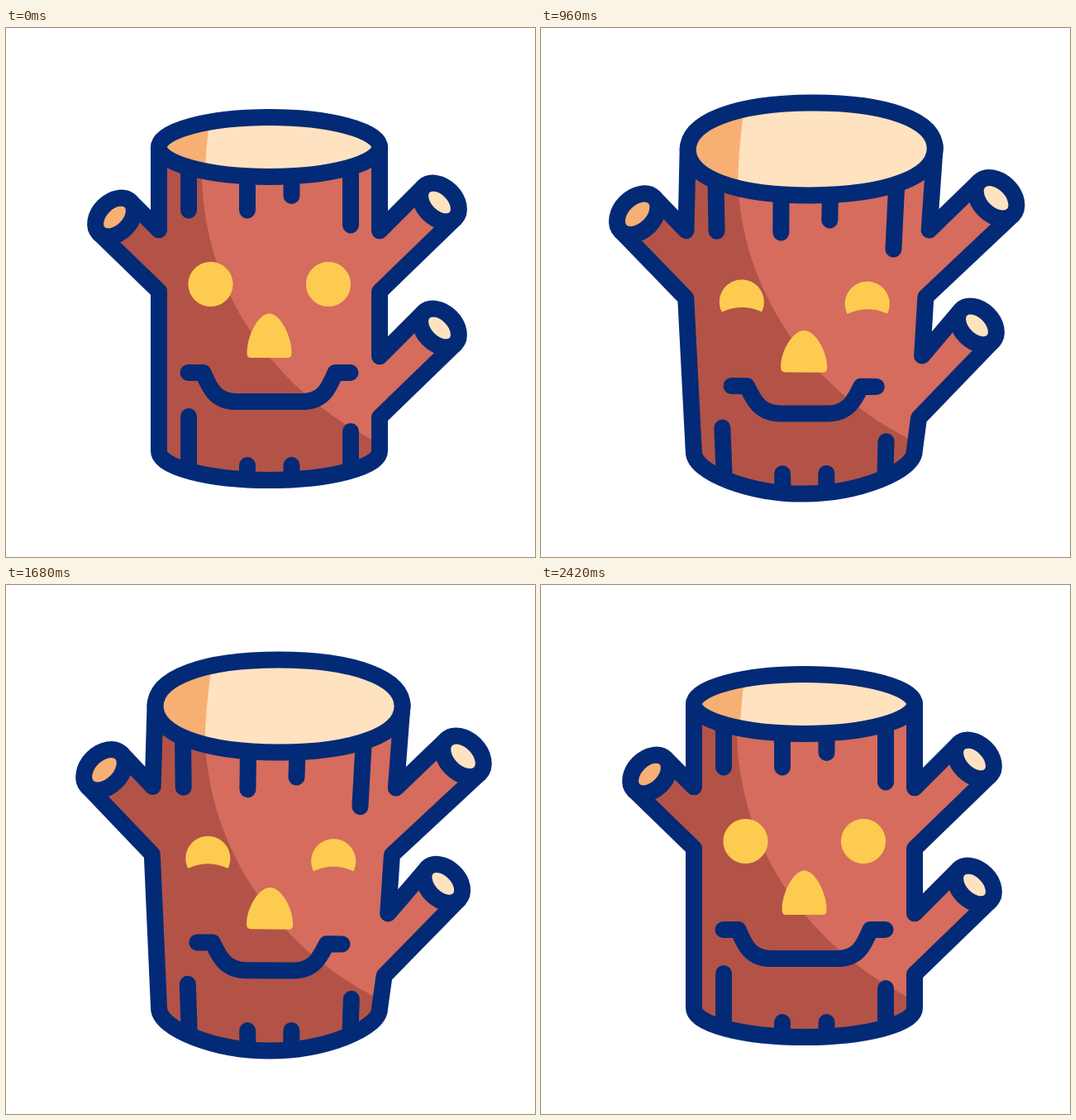
Animation of 640x640 px, one loop 2.8 s. Source, as an HTML page with a canvas:

```html
<!DOCTYPE html>
<html lang="en">
<head>
<meta charset="utf-8">
<title>Swaying stump</title>
<style>
  html, body { margin: 0; width: 100%; height: 100%; overflow: hidden; background: #fff; }
  canvas { display: block; width: 100%; height: 100%; }
</style>
</head>
<body>
<canvas id="stage" width="640" height="640"></canvas>
<script>
const ctx = document.getElementById('stage').getContext('2d');
const LOOP = 2800;
const NAVY = '#032a76', BARK = '#d56c5d', SHADE = '#b35347';
const CREAM = '#ffe2c0', ORANGE = '#f7af74', YELLOW = '#fdcb50';

const CENTER = 318.5, TOP = 144, BOTTOM = 512, HALF = 133.5;
const PIVOT = [332, 546];
const ROUND = 0.552; // Bezier handle length of a circle quadrant
const SLANT = Math.PI / 4;

// Swings that die away: [time in ms, degrees]
const SWAY = [[120, 0], [370, -2], [730, 8], [1140, -6], [1500, 4], [1800, -2], [2130, 1.2], [2420, 0]];

// Cut ends, and how far each moves when the trunk stretches
const LEFT = { x: 131.5, y: 229, side: -1, pull: [-13, -5], grow: 0.06, color: ORANGE };
const UPPER = { x: 524.5, y: 211, side: 1, pull: [28, -4], grow: 0.06, color: CREAM };
const LOWER = { x: 524.5, y: 363, side: 1, pull: [4, -2], grow: 0, color: CREAM };

// [x, end of the groove from the rim, start of the groove from the base]
const GROOVES = [[221, 220.5, 470], [292, 220.5, 529], [345.5, 203, 529], [417, 238.5, 488]];

const clamp = v => Math.min(1, Math.max(0, v));
const smooth = u => u * u * (3 - 2 * u);
const progress = (t, from, to) => clamp((t - from) / (to - from));

function swayAt(t) {
  let angle = 0;
  for (let i = 1; i < SWAY.length; i++) {
    const [t0, a0] = SWAY[i - 1], [t1, a1] = SWAY[i];
    if (t >= t0) angle = a0 + (a1 - a0) * smooth(progress(t, t0, t1));
  }
  return angle;
}

function joyAt(t) {
  const out = progress(t, 1690, 2420);
  return smooth(progress(t, 370, 690)) - (out + smooth(out)) / 2;
}

let joy = 0;
const mix = (calm, happy) => calm + (happy - calm) * joy;
const heightOf = y => (BOTTOM - y) / (BOTTOM - TOP);

// The silhouette widens and leans towards the top.
function edge(side, y, drop = 0) {
  const k = heightOf(y);
  return [CENTER + side * HALF + joy * (11 * k * k + side * 16 * Math.sqrt(k)), y + joy * drop * k];
}

// The front of the trunk slides down as the rim opens towards the viewer.
function front(x, y) {
  const k = heightOf(y), dx = x - CENTER;
  return [x + joy * (4 * k * k + dx / HALF * 16 * k), y + joy * (11 + 21 * k + 0.04 * dx * k)];
}

// Builds a path from M/L/Q/C commands and a list of points.
function trace(commands, points) {
  const path = new Path2D();
  let i = 0;
  const take = count => points.slice(i, i += count).flat();
  for (const c of commands) {
    if (c === 'M') path.moveTo(...take(1));
    else if (c === 'L') path.lineTo(...take(1));
    else if (c === 'Q') path.quadraticCurveTo(...take(2));
    else if (c === 'C') path.bezierCurveTo(...take(3));
    else path.closePath();
  }
  return path;
}

// Half an oval from one side to the other; a negative ry bulges upwards.
function halfOval(path, x, y, rx, ry, fullness) {
  path.bezierCurveTo(x - rx, y + ry * fullness, x - rx * fullness, y + ry, x, y + ry);
  path.bezierCurveTo(x + rx * fullness, y + ry, x + rx, y + ry * fullness, x + rx, y);
}

function fill(path, color) {
  ctx.fillStyle = color;
  ctx.fill(path);
}

function clipped(mask, draw) {
  ctx.save();
  ctx.clip(mask);
  draw();
  ctx.restore();
}

function branchEnd({ x, y, side, pull, grow }) {
  return {
    x: x + joy * pull[0],
    y: y + joy * pull[1],
    long: 27 * (1 + joy * grow),
    short: 19 * (1 + joy * grow),
    turn: side * SLANT
  };
}

// Outline of a branch from the notch above it to the trunk below it.
function branchOutline(branch) {
  const { x, y, side } = branch;
  const gap = Math.abs(x - CENTER) - HALF, spread = 27 * Math.SQRT1_2;
  const end = branchEnd(branch), reach = end.long * Math.SQRT1_2;
  return [
    edge(side, y - spread + gap - spread),
    [end.x - side * reach, end.y - reach],
    [end.x + side * reach, end.y + reach],
    edge(side, y + spread + 0.97 * (gap + spread), 14)
  ];
}

function drawTrunk() {
  const left = [edge(-1, TOP), ...branchOutline(LEFT), edge(-1, BOTTOM)];
  const right = [edge(1, TOP), ...branchOutline(UPPER), ...branchOutline(LOWER), edge(1, BOTTOM)];
  const trunk = trace('MLLLLL', left);
  halfOval(trunk, CENTER, BOTTOM, HALF, mix(35, 51.5), mix(ROUND, 0.49));
  right.reverse().forEach(p => trunk.lineTo(...p));
  trunk.closePath();

  const shift = 3 * joy;
  fill(trunk, BARK);
  clipped(trunk, () => {
    fill(trace('MLCLLLZ', [
      [237 + shift, 100], [237 + shift, 180],
      [240 + shift, 320], [325 + shift, 437], [443 + shift, 498],
      [443 + shift, 620], [60, 620], [60, 100]]), SHADE);
    for (const [x, upper, lower] of GROOVES) {
      ctx.stroke(trace('ML', [front(x, 155), front(x, upper)]));
      ctx.stroke(trace('ML', [front(x, lower), front(x, 560)]));
    }
  });
  ctx.stroke(trunk);
}

function drawBranchEnd(branch) {
  const { x, y, long, short, turn } = branchEnd(branch);
  const path = new Path2D();
  path.ellipse(x, y, long, short, turn, 0, Math.PI * 2);
  fill(path, branch.color);
  ctx.stroke(path);
}

function drawRim() {
  const x = CENTER + 11 * joy, y = TOP + 2.5 * joy;
  const rx = HALF + 16 * joy, ry = 36 + 20 * joy, fullness = mix(ROUND, 0.61);
  const rim = trace('M', [[x - rx, y]]);
  halfOval(rim, x, y, rx, -ry, fullness);
  halfOval(rim, x, y, -rx, ry, fullness);
  fill(rim, CREAM);
  clipped(rim, () => fill(trace('MLQLZ',
    [[150, 60], [248, 100], [241, 145], [240, 195], [150, 240]]), ORANGE));
  ctx.stroke(rim);
}

// A disc whose lower part is pushed up into a smile.
function drawEye(x, y) {
  const [cx, cy] = front(x, y), r = 27, points = [];
  for (let a = 0; a < Math.PI * 2; a += Math.PI / 60) {
    const dx = r * Math.cos(a), dy = r * Math.sin(a);
    const cheek = 6.5 + 7 * Math.cos(a) ** 2;
    points.push([cx + dx, cy + mix(dy, Math.min(dy, cheek))]);
  }
  fill(trace('M' + 'L'.repeat(points.length - 1) + 'Z', points), YELLOW);
}

function mirrored(half) {
  return [...half.map(([dx, y]) => [-dx, y]), ...half.slice().reverse()];
}

function drawNose() {
  const half = [[22, 399], [27, 399], [27, 393], [27, 372], [13, 345.5], [0, 345.5]];
  const points = mirrored(half).map(([dx, y]) => front(CENTER + dx, y));
  points.splice(half.length, 1); // both halves share the tip
  fill(trace('MQCCQZ', points), YELLOW);
}

function drawMouth() {
  const half = [[98, 417], [80, 417], [72, 436], [65, 452], [40, 452]];
  const points = mirrored(half).map(([dx, y]) => front(CENTER + dx - Math.sign(dx) * 13 * joy, y));
  ctx.stroke(trace('MLCLCL', points));
}

function draw(t) {
  joy = joyAt(t);
  ctx.setTransform(1, 0, 0, 1, 0, 0);
  ctx.fillStyle = '#fff';
  ctx.fillRect(0, 0, 640, 640);
  ctx.translate(...PIVOT);
  ctx.rotate(swayAt(t) * Math.PI / 180);
  ctx.translate(-PIVOT[0], -PIVOT[1]);
  ctx.strokeStyle = NAVY;
  ctx.lineWidth = 20;
  ctx.lineCap = ctx.lineJoin = 'round';

  drawTrunk();
  [LEFT, UPPER, LOWER].forEach(drawBranchEnd);
  drawRim();
  drawEye(247.5, 310);
  drawEye(390, 310);
  drawNose();
  drawMouth();
}

const start = performance.now();
function tick() {
  draw((performance.now() - start) % LOOP);
  requestAnimationFrame(tick);
}
tick();
</script>
</body>
</html>
```
